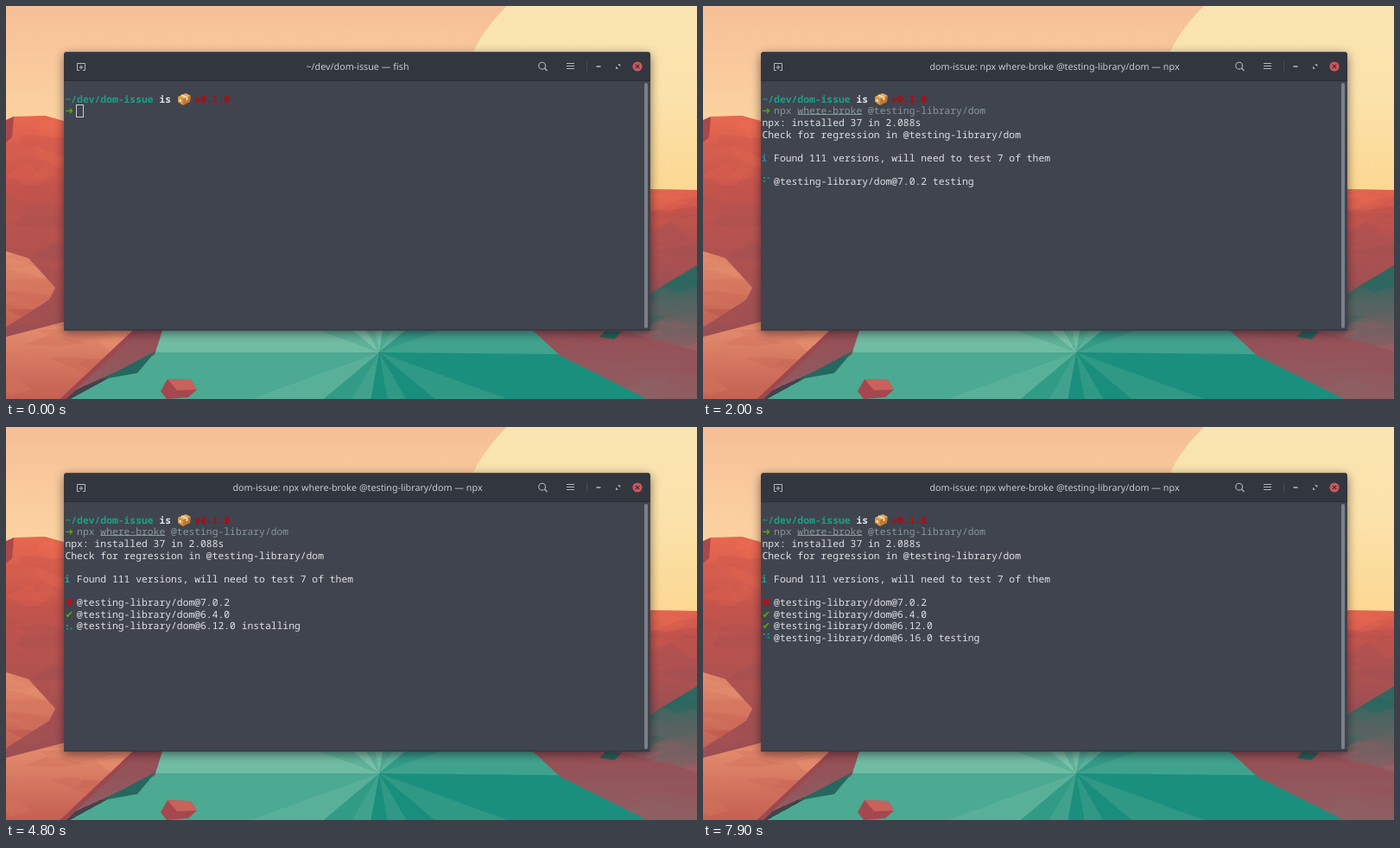
Animation, 800 px wide and 455 px high, one loop 8000 ms. Source, as an HTML page with a canvas:

```html
<!DOCTYPE html>
<html lang="en">
<head>
<meta charset="utf-8">
<title>Terminal</title>
<style>
html, body { margin: 0; width: 100%; height: 100%; overflow: hidden; background: #40444e; }
canvas { display: block; width: 100vw; height: 100vh; }
</style>
</head>
<body>
<canvas id="stage" width="800" height="455"></canvas>
<script>
const W = 800, H = 455, LOOP = 8000;
const view = document.getElementById('stage').getContext('2d');
const backdrop = document.createElement('canvas');
backdrop.width = W;
backdrop.height = H;
let g = backdrop.getContext('2d');

let seed = 7;
function rand(lo = 0, hi = 1) {
  seed = (seed * 16807) % 2147483647;
  return lo + (hi - lo) * seed / 2147483647;
}

function trace(p) {
  g.beginPath();
  for (let i = 0; i < p.length; i += 2) g.lineTo(p[i], p[i + 1]);
}

function poly(color, ...p) {
  g.fillStyle = color;
  trace(p);
  g.fill();
}

function line(color, width, ...p) {
  g.strokeStyle = color;
  g.lineWidth = width;
  trace(p);
  g.stroke();
}

function disc(color, x, y, r) {
  g.fillStyle = color;
  g.beginPath();
  g.arc(x, y, r, 0, Math.PI * 2);
  g.fill();
}

function panel(color, x, y, w, h, radii) {
  g.fillStyle = color;
  g.beginPath();
  g.roundRect(x, y, w, h, radii);
  g.fill();
}

function fade(y0, y1, ...colors) {
  const s = g.createLinearGradient(0, y0, 0, y1);
  colors.forEach((c, i) => s.addColorStop(i / (colors.length - 1), c));
  return s;
}

// Blend of two [r, g, b] colours
const mix = (a, b, k) => `rgb(${a.map((v, i) => v + (b[i] - v) * k)})`;

// A low-poly landform: vertical fade broken by random slivers of its two tones
function land(top, bottom, ...p) {
  const xs = p.filter((_, i) => i % 2 === 0), ys = p.filter((_, i) => i % 2);
  const x0 = Math.min(...xs), x1 = Math.max(...xs);
  const y0 = Math.min(...ys), y1 = Math.max(...ys);
  g.save();
  poly(fade(y0, y1, mix(top, bottom, 0), mix(top, bottom, 1)), ...p);
  g.clip();
  g.globalAlpha = .45;
  for (let i = 0; i < 9; i++) {
    const x = rand(x0, x1), y = y0 + (i + rand()) / 9 * (y1 - y0);
    const w = rand(15, 50), h = rand(4, 14);
    const k = (y - y0) / (y1 - y0) + rand(-.5, .5);
    poly(mix(top, bottom, k), x - w, y + rand(-h, h), x + rand(-w, w), y - h, x + w, y + rand(-h, h), x, y + h);
  }
  g.restore();
}

const CORAL = [232, 104, 80], BRICK = [196, 84, 76], MAUVE = [150, 78, 84];
const PEACH = [230, 142, 110], CLAY = [196, 96, 82], DUSK = [142, 94, 98];
const PINE = [36, 104, 96], TEAL_DARK = [26, 142, 124], MINT = [172, 220, 188];

function drawSky() {
  g.fillStyle = fade(0, 215, '#f6bf97', '#fbcf9f', '#fcdca4');
  g.fillRect(0, 0, W, 220);
  disc(fade(0, 215, '#f9e4b1', '#fbe2aa', '#fcd791'), 701, 130, 177.6);
}

// Facets fan out from one bright point of the water
function drawLake() {
  const x = 432, y = 401, count = 18;
  g.save();
  trace([170, 372, 610, 372, 642, 405, 748, 455, 75, 455, 172, 402]);
  g.clip();
  for (let i = 0; i < count; i++) {
    const a = i / count * Math.PI * 2, b = a + Math.PI * 2 / count + .01;
    const tone = .3 - .2 * Math.cos(a) - .17 * Math.sin(a) + (i % 2 ? .09 : -.09);
    poly(mix(TEAL_DARK, MINT, Math.max(0, tone)),
      x, y, x + 600 * Math.cos(a), y + 600 * Math.sin(a), x + 600 * Math.cos(b), y + 600 * Math.sin(b));
  }
  g.restore();
}

function drawLand() {
  land(BRICK, MAUVE, 0, 206, 70, 204, 70, 400, 0, 400);
  land(CORAL, BRICK, 0, 148, 9, 128, 45, 127, 70, 134, 70, 206, 0, 208);
  poly('#a9474a', 0, 132, 9, 128, 7, 152, 0, 158);
  land(PEACH, CLAY, 0, 284, 26, 292, 57, 326, 50, 340, 0, 372);
  land(MAUVE, DUSK, 60, 372, 182, 372, 172, 404, 90, 440, 60, 455);
  land(PEACH, CLAY, 0, 383, 66, 366, 150, 376, 84, 438, 66, 455, 0, 455);
  line('#9c4850', 5, 152, 374, 84, 438, 64, 457);
  poly(mix(PINE, PINE, 0), 174, 399, 152, 425, 112, 432);

  land(CORAL, BRICK, 744, 212, 800, 213, 800, 252, 744, 252);
  land(BRICK, MAUVE, 744, 240, 800, 232, 800, 345, 744, 345);
  land(MAUVE, DUSK, 606, 372, 800, 372, 800, 455, 742, 455, 642, 405);
  land(PINE, DUSK, 744, 334, 800, 300, 800, 400, 772, 391, 712, 376, 744, 372);
  poly('#245f59', 687, 383, 694, 376, 713, 377, 704, 386);
  poly('#a5474e', 179, 446, 187, 432, 214, 433, 221, 444, 211, 453, 186, 455);
  poly('#c9625b', 187, 432, 214, 433, 221, 444, 198, 445);
}

function drawWindow() {
  g.save();
  g.shadowColor = 'rgba(20,10,20,.55)';
  g.shadowBlur = 12;
  g.shadowOffsetY = 3;
  panel('#40444e', 67, 53, 679, 322.5, [4, 4, 1, 1]);
  g.restore();
  panel('#32363e', 67, 53, 679, 34, [4, 4, 0, 0]);
  line('#454951', 1, 70, 53.5, 743, 53.5);
  line('#2a2d34', 1, 67, 86.5, 746, 86.5);
  line('#30333b', 1, 67, 375, 746, 375);
  panel('#7b7f88', 739, 89, 4, 284, 2);
}

function drawControls() {
  const ink = '#b4b8c0';
  line(ink, 1, 85, 74.5, 82.5, 74.5, 82.5, 66.5, 91.5, 66.5, 91.5, 74.5, 89, 74.5);
  line(ink, 1, 87, 68.5, 87, 73.5);
  line(ink, 1, 84.5, 71, 89.5, 71);
  g.lineWidth = 1.1;
  g.beginPath();
  g.arc(620.7, 69.2, 3.9, 0, Math.PI * 2);
  g.stroke();
  line(ink, 1.2, 623.5, 72, 626.5, 75);
  for (let y = 66.5; y < 74; y += 3) line(ink, 1, 649, y, 658, y);
  line('#464a52', 1, 672.5, 64, 672.5, 76);
  line(ink, 1.5, 683.5, 70, 688.5, 70);
  poly(ink, 708.2, 67.2, 711.2, 67.2, 711.2, 70.2);
  poly(ink, 706, 69.8, 706, 72.8, 709, 72.8);
  disc('#cc575d', 731, 70, 5.6);
  for (const d of [-2.2, 2.2]) line('#3a2d34', 1.2, 731 - d, 67.8, 731 + d, 72.2);
}

function drawBox() {
  poly('#e8ab5c', 199, 105, 208, 101, 214, 104, 205, 108);
  poly('#d9963f', 199, 105, 205, 108, 205, 115, 199, 111);
  poly('#bd7a32', 205, 108, 214, 104, 213, 111, 205, 115);
  line('#f3dcae', 1.8, 203, 103, 209.5, 106, 209.5, 109);
  poly('#f0e4d2', 200.5, 107.5, 203, 108.8, 203, 111.3, 200.5, 110);
}

const MONO = '11.35px "Noto Sans Mono", monospace';
const CELL = 6.81, LEFT = 68.5, TOP = 111.7, PITCH = 13.63;
const FG = '#dfe1e5', DIM = '#87979a', TEAL = '#19a187', RED = '#c80a0d', GREEN = '#58a613';
const colX = c => LEFT + c * CELL;
const rowY = r => TOP + r * PITCH;

function put(col, row, str, color = FG, font = MONO) {
  g.font = font;
  g.fillStyle = color;
  g.fillText(str, colX(col), rowY(row));
}
const bold = (col, row, str, color) => put(col, row, str, color, 'bold ' + MONO);
const mark = (row, str, color) => put(0, row, str, color, 'bold 11.5px "DejaVu Sans", sans-serif');

function cursor(col, row) {
  g.strokeStyle = '#c9ccd2';
  g.lineWidth = 1;
  g.strokeRect(Math.round(colX(col)) - .5, Math.round(rowY(row)) - 10.5, 8, 14);
}

const PKG = '@testing-library/dom';
const COMMAND = 'npx where-broke ' + PKG;
const TYPING = 400, ENTER = 500;
const OUTPUT = [
  { at: 700, row: 2, str: 'npx: installed 37 in 2.088s' },
  { at: 800, row: 3, str: 'Check for regression in ' + PKG },
  { at: 900, row: 5, str: '  Found 111 versions, will need to test 7 of them' }
];
const RUNS = [
  { ver: '7.0.2', from: 1000, test: 1900, end: 2400, turn: 0, ok: false },
  { ver: '6.4.0', from: 2400, test: 4000, end: 4500, turn: 0, ok: true },
  { ver: '6.12.0', from: 4500, test: 5300, end: 5800, turn: 6, ok: true },
  { ver: '6.16.0', from: 5800, test: 7300, end: LOOP, turn: 4, ok: true }
];
const SPIN = '⠋⠙⠹⠸⠼⠴⠦⠧⠇⠏';

// Braille bits 0-2 are the left column, 3-5 the right one
function spinner(row, index) {
  const bits = SPIN.charCodeAt(index % 10) - 0x2800;
  for (let i = 0; i < 6; i++) {
    if (bits >> i & 1) disc(TEAL, i < 3 ? 71 : 75.6, rowY(row) - 8 + (i % 3) * 3.6, 1.05);
  }
}

function drawTitle(running) {
  g.font = '10.75px "Noto Sans", "Open Sans", sans-serif';
  g.fillStyle = '#c6cad2';
  g.textAlign = 'center';
  g.fillText(running ? 'dom-issue: ' + COMMAND + ' — npx' : '~/dev/dom-issue — fish', 407, 73.6);
  g.textAlign = 'left';
}

function drawPrompt(t) {
  bold(0, 0, '~/dev/dom-issue', TEAL);
  bold(16, 0, 'is', FG);
  drawBox();
  bold(22, 0, 'v0.1.0', '#b40a0d');
  mark(1, '➜', GREEN);
  const count = Math.min(COMMAND.length, Math.floor(t / TYPING * COMMAND.length));
  put(2, 1, COMMAND.slice(0, count), DIM);
  const under = Math.min(15, count);
  if (under > 4) line(DIM, 1, colX(6), 125.5, colX(2 + under), 125.5);
  if (t < ENTER) cursor(2 + count, 1);
}

function drawOutput(t) {
  const shown = OUTPUT.filter(o => t >= o.at);
  for (const { row, str } of shown) put(0, row, str);
  if (shown.length === OUTPUT.length) bold(-.15, 5, 'i', t < 2800 ? '#3d7fa0' : '#279b91');
  if (t >= ENTER && t < RUNS[0].from) cursor(0, shown.length ? shown.at(-1).row + 1 : 2);
  RUNS.forEach((run, i) => {
    if (t < run.from) return;
    const row = 7 + i, done = t >= run.end;
    const state = done ? '' : t < run.test ? ' installing' : ' testing';
    put(2, row, PKG + '@' + run.ver + state);
    if (done) mark(row, run.ok ? '✔' : '✖', run.ok ? GREEN : RED);
    else spinner(row, Math.floor(t / 40 + run.turn));
  });
}

drawSky();
drawLake();
drawLand();
drawWindow();
drawControls();
g = view;
g.textRendering = 'geometricPrecision';

function frame(now) {
  const t = Math.floor(now % LOOP / 100) * 100;
  g.drawImage(backdrop, 0, 0);
  drawTitle(t >= ENTER);
  drawPrompt(t);
  drawOutput(t);
  requestAnimationFrame(frame);
}
frame(0);
</script>
</body>
</html>
```
